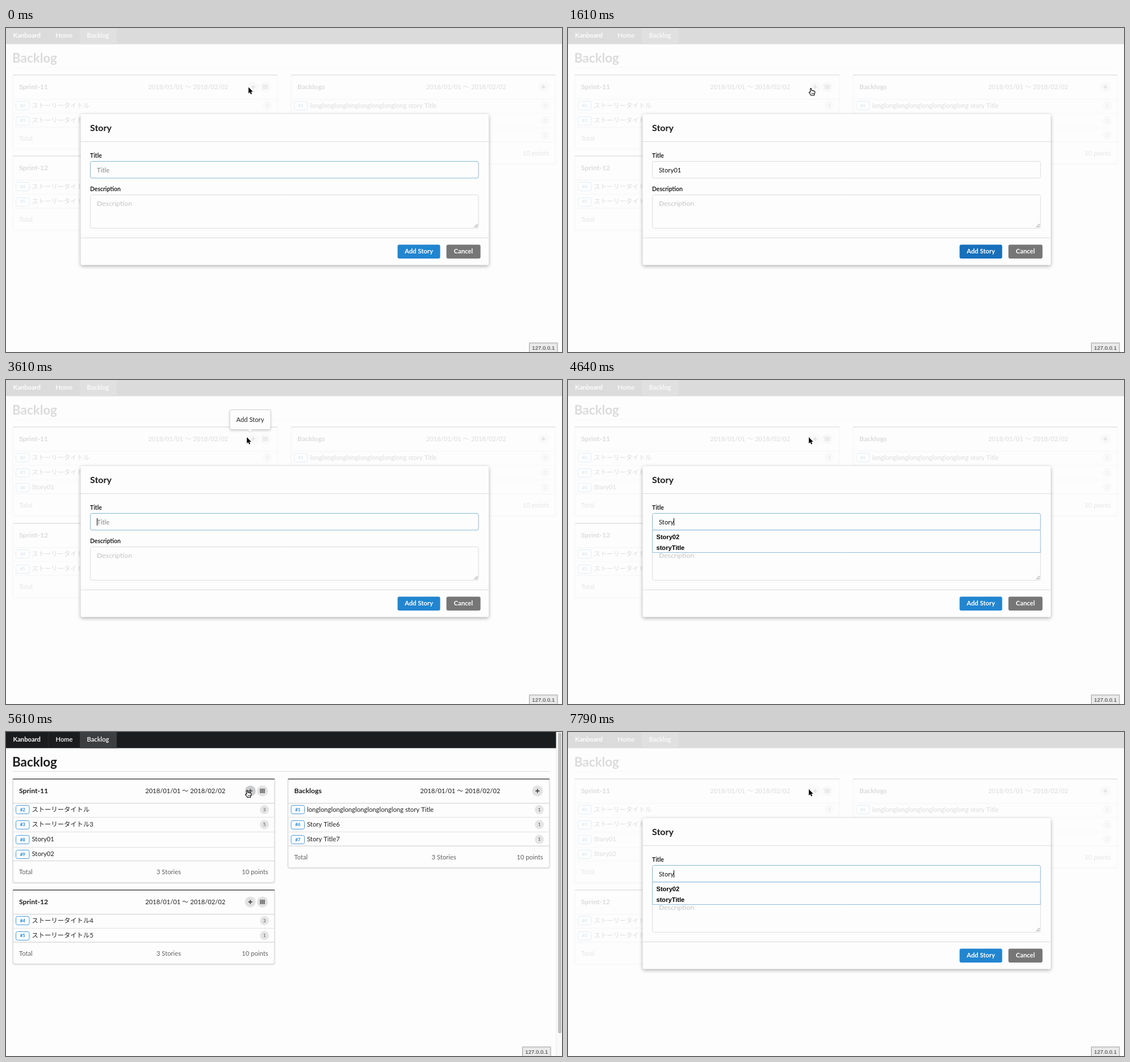
These frames come from a looping animation (979x572 px, 8000 ms). An HTML page with a canvas:

```html
<!DOCTYPE html>
<html lang="en">
<head>
<meta charset="utf-8">
<title>Backlog</title>
<style>
html, body { margin: 0; width: 100%; height: 100%; overflow: hidden; background: #fdfdfd; }
canvas { display: block; }
</style>
</head>
<body>
<canvas id="stage" width="979" height="572"></canvas>
<script>
const ctx = document.getElementById('stage').getContext('2d');
const LOOP = 8000;
const WHITE = '#fdfdfd';
const LINE = '#d9d9da';
const LATO = "Lato, 'Noto Sans CJK JP', 'Noto Sans CJK', sans-serif";
const ARIAL = "'Liberation Sans', sans-serif";

// [time, title text, number of suggestions]
const TYPING = [
  [0, '', 0], [50, 'S', 2], [230, 'St', 2], [307, 'Sto', 2], [383, 'Stor', 2],
  [460, 'Story', 2], [700, 'Story0', 1], [880, 'Story01', 0],
  [3550, '', 0], [4090, 'S', 0], [4180, 'S', 2], [4350, 'St', 2], [4450, 'Sto', 2],
  [4545, 'Stor', 2], [4640, 'Story', 2], [4820, 'Story0', 1], [4930, 'Story02', 0],
  [6660, '', 0], [7230, 'S', 0], [7290, 'S', 2], [7490, 'St', 2], [7590, 'Sto', 2],
  [7690, 'Stor', 2], [7790, 'Story', 2]
];
const FOCUS = [
  [0, 'title'], [1230, 'moving'], [1290, 'text'], [1440, 'button'],
  [3550, 'title'], [5230, 'moving'], [5290, 'text'], [5470, 'button'], [6660, 'title']
];
const MODAL = [[0, 1], [1690, 0], [3550, 0.4], [3610, 1], [5610, 0], [6660, 0.4], [6720, 1]];
const POPUP = [
  [0, 0], [1750, 1], [2560, 0.65], [2610, 0.3], [2670, 0], [2840, 0.5], [2900, 1],
  [3670, 0], [5670, 1], [6780, 0]
];
const HOVER = [[0, 0], [1610, 1], [2560, 0], [2780, 1], [3550, 0], [5610, 1], [6660, 0]];
const POINTER = [
  [0, 427, 104.5], [2380, 425.5, 104.3], [2440, 424, 104], [2500, 422, 103], [2560, 420, 102],
  [2610, 418.5, 101.5], [2670, 417.5, 101], [2720, 417, 101], [2780, 418, 101],
  [2840, 419, 101], [2900, 419.5, 101], [3130, 421.5, 101], [3190, 424, 101],
  [7999.9, 424, 101]
];

function at(list, t) {
  let hit = list[0];
  for (const key of list) if (key[0] <= t) hit = key;
  return hit;
}

function text(s, x, y, size, color, o = {}) {
  ctx.font = `${o.weight || 400} ${size}px ${o.font || LATO}`;
  ctx.textAlign = o.align || 'left';
  ctx.fillStyle = color;
  ctx.fillText(s, x, y);
}

function rect(x, y, w, h, color) {
  ctx.fillStyle = color;
  ctx.fillRect(x, y, w, h);
}

function box(x, y, w, h, r, fill, stroke, width = 1) {
  ctx.beginPath();
  ctx.roundRect(x, y, w, h, r);
  if (fill) { ctx.fillStyle = fill; ctx.fill(); }
  if (stroke) { ctx.strokeStyle = stroke; ctx.lineWidth = width; ctx.stroke(); }
}

function disc(x, y, r, color) {
  ctx.beginPath();
  ctx.arc(x, y, r, 0, Math.PI * 2);
  ctx.fillStyle = color;
  ctx.fill();
}

function poly(points, fill, stroke, width) {
  ctx.beginPath();
  points.forEach(([x, y]) => ctx.lineTo(x, y));
  ctx.closePath();
  ctx.lineJoin = 'round';
  if (stroke) { ctx.strokeStyle = stroke; ctx.lineWidth = width; ctx.stroke(); }
  if (fill) { ctx.fillStyle = fill; ctx.fill(); }
}

function shadow(color, blur, dy, draw) {
  ctx.save();
  ctx.shadowColor = color;
  ctx.shadowBlur = blur;
  ctx.shadowOffsetY = dy;
  draw();
  ctx.restore();
}

function plusButton(x, y, hot) {
  disc(x, y, 9.5, hot ? '#cacbcd' : '#e2e2e3');
  rect(x - 3.5, y - 1, 7, 2, '#555');
  rect(x - 1, y - 3.5, 2, 7, '#555');
}

function gridButton(x, y) {
  disc(x, y, 9.5, '#e2e2e3');
  for (let i = 0; i < 9; i++) {
    rect(x - 4.4 + (i % 3) * 3.1, y - 3.8 + Math.floor(i / 3) * 2.7, 2.6, 2.1, '#5a5a5a');
  }
}

// Draws a card and returns its height.
function card(x, y, w, title, rows, o = {}) {
  const n = rows.length, right = x + w, step = 26.2;
  const foot = 40.5 + step * n, height = foot + 38.5;
  shadow('rgba(34,36,38,.13)', 2, 1, () =>
    box(x + 0.5, y + 0.5, w - 1, height - 0.5, 3, WHITE, LINE));
  box(x, y, w, 2, [2, 2, 0, 0], '#767676');

  text(title, x + 11.5, y + 26, 12.2, '#1d1d1d', { weight: 700 });
  text('2018/01/01 ～ 2018/02/02', right - 87.3, y + 26, 11.2, '#222', { align: 'right' });
  if (o.grid) gridButton(right - 22, y + 22);
  plusButton(right - (o.grid ? 43.3 : 21.7), y + 22, o.hot);

  rect(x, y + 43, w, 1.4, LINE);
  rows.forEach(([id, name, points], i) => {
    const mid = y + 54.8 + step * i;
    if (i) rect(x, Math.round(mid - 12.8), w, 1, '#e0e0e1');
    box(x + 6, Math.round(mid - 7.5) + 0.5, 23.5, 15, 3, WHITE, '#4a9ad8');
    text('#' + id, x + 17.8, mid + 3.3, 8, '#2185d0', { weight: 700, align: 'center' });
    text(name, x + 34, mid + 3.8, 11.3, '#222');
    if (points) {
      disc(right - 18.5, mid + 0.3, 8, '#e5e5e5');
      text(points, right - 18.5, mid + 3.2, 8, '#666', { weight: 600, align: 'center' });
    }
  });
  rect(x, y + foot - 0.5, w, 1.4, LINE);

  const base = y + foot + 24;
  text('Total', x + 11.5, base, 11.2, '#606060');
  text('3 Stories', x + 275, base, 11.2, '#606060', { align: 'center' });
  text('10 points', right - 12, base, 11.2, '#606060', { align: 'right' });
  return height;
}

function page(t, wide, hot) {
  const W = wide ? 979 : 969, grow = wide ? 5 : 0;
  rect(0, 0, 979, 572, WHITE);
  rect(0, 0, W, 28.5, '#1b1c1d');
  rect(130, 0, 65, 28.5, '#3d3e3f');
  rect(74, 0, 1, 28, '#2a2b2c');
  text('Kanboard', 12.5, 17, 11.2, '#fff', { weight: 700 });
  text('Home', 87.5, 17, 11.2, '#fff', { weight: 600 });
  text('Backlog', 142.5, 17, 11.2, '#fff', { weight: 600 });
  text('Backlog', 11, 61, 22.4, '#1d1d1d', { weight: 700 });
  rect(11.5, 69, W - 22.5, 1, '#dcdcdc');

  const sprint = [[2, 'ストーリータイトル', '3'], [3, 'ストーリータイトル3', '5']];
  if (t >= 1690) sprint.push([8, 'Story01']);
  if (t >= 5610) sprint.push([9, 'Story02']);
  const left = 11.5, w = 462 + grow;
  const h = card(left, 82, w, 'Sprint-11', sprint, { grid: true, hot });
  card(left, Math.round(82 + h + 12), w, 'Sprint-12', [
    [4, 'ストーリータイトル4', '3'], [5, 'ストーリータイトル5', '1']
  ], { grid: true });
  card(496 + grow * 1.1, 82, 461.5 + grow, 'Backlogs', [
    [1, 'longlonglonglonglonglonglonglong story Title', '1'],
    [6, 'Story Title6', '1'], [7, 'Story Title7', '1']
  ]);

  if (!wide) {
    rect(969, 0, 10, 572, '#fafafa');
    rect(968.5, 0, 1, 572, '#e9e9e9');
    box(972, 1, 6, 531, 3, '#c1c1c1');
  }
}

function caret(x, y) {
  rect(Math.round(x), y, 1, 13, '#000');
}

function suggestions(count) {
  if (!count) return;
  const h = count === 2 ? 39.5 : 20.5;
  box(148.5, 265, 683.5, h, 0, WHITE, '#8dbcdf');
  ['Story02', 'storyTitle'].slice(0, count).forEach((s, i) =>
    text(s, 155.5, 280.5 + i * 19.3, 11.1, '#000', { weight: 700, font: ARIAL }));
}

function modal(t) {
  const focus = at(FOCUS, t)[1];
  const [, title, count] = at(TYPING, t);
  const border = name => focus === name ? '#85b7d9' : focus === 'moving' ? '#b2cbdc' : '#dcdcdd';

  shadow('rgba(0,0,0,.32)', 6, 2, () => box(131.5, 152, 718.5, 266.5, 3, WHITE));
  text('Story', 148, 182.3, 16, '#1d1d1d', { weight: 700 });
  rect(131.5, 200, 718.5, 1, '#dcdcdd');
  text('Title', 148, 228.5, 10.4, '#222', { weight: 700 });
  box(148.5, 235.5, 683.5, 29.5, 3, WHITE, border('title'));
  text('Description', 148, 287.5, 10.4, '#222', { weight: 700 });
  box(148.5, 294.5, 683.5, 59, 3, WHITE, border('text'));
  text('Description', 160, 313.8, 12.2, focus === 'text' ? '#858585' : '#c4c4c4');
  if (focus === 'text') caret(160, 303);

  ctx.strokeStyle = '#777';
  ctx.lineWidth = 1;
  ctx.beginPath();
  ctx.moveTo(824.5, 352); ctx.lineTo(830.5, 346);
  ctx.moveTo(828, 352); ctx.lineTo(830.5, 349.5);
  ctx.stroke();

  if (title) text(title, 160, 255, 11.3, '#111');
  else text('Title', 160, 255, 11.4, focus === 'title' ? '#858585' : '#c4c4c4');
  if (focus === 'title' && t >= 50) {
    ctx.font = `400 11.3px ${LATO}`;
    caret(160 + ctx.measureText(title).width, 244);
  }
  suggestions(count);

  rect(131.5, 370, 718.5, 1, '#dcdcdd');
  box(689.5, 382.5, 75, 24.5, 3, focus === 'button' ? '#1670bb' : '#2185d0');
  text('Add Story', 727, 398.3, 11.3, '#fff', { weight: 700, align: 'center' });
  box(775.5, 382.5, 60, 24.5, 3, '#767676');
  text('Cancel', 805.3, 398.3, 11.3, '#fff', { weight: 700, align: 'center' });
}

function popup() {
  const tip = [[425.5, 87.5], [430, 92], [434.5, 87.5]];
  poly(tip, WHITE, '#cfcfd0', 1.4);
  shadow('rgba(34,36,38,.2)', 4, 2, () => box(394, 52.5, 72, 35, 3, WHITE));
  box(394, 52.5, 72, 35, 3, WHITE, '#d0d0d1');
  poly(tip, WHITE);
  text('Add Story', 430, 73.5, 11.2, '#222', { align: 'center' });
}

function arrow(x, y) {
  const shape = [[0, 0], [0, 11], [2.5, 8.7], [4.1, 12.6], [6, 11.8], [4.4, 8], [7.8, 8]];
  poly(shape.map(([a, b]) => [x + a, y + b]), '#000', '#fff', 1.6);
}

function hand(x, y) {
  ctx.save();
  ctx.translate(x - 3, y + 1.5);
  ctx.beginPath();
  ctx.moveTo(2.8, 7.2);
  ctx.lineTo(2.6, 1.6);
  ctx.quadraticCurveTo(3.5, -0.3, 4.6, 1.4);
  ctx.lineTo(5, 4.6);
  ctx.quadraticCurveTo(6.2, 3.6, 7, 5);
  ctx.quadraticCurveTo(8.3, 4.1, 9, 5.5);
  ctx.quadraticCurveTo(10.8, 5, 10.9, 7);
  ctx.quadraticCurveTo(11, 9, 9.6, 11);
  ctx.lineTo(9.5, 13);
  ctx.lineTo(4, 13);
  ctx.quadraticCurveTo(3, 10.8, 0.6, 8.4);
  ctx.quadraticCurveTo(0.6, 6.3, 2.8, 7.2);
  ctx.closePath();
  ctx.fillStyle = '#fff';
  ctx.fill();
  ctx.strokeStyle = '#000';
  ctx.lineWidth = 1.1;
  ctx.lineJoin = 'round';
  ctx.stroke();
  ctx.beginPath();
  [5.2, 6.9, 8.6].forEach(k => { ctx.moveTo(k, 8.5); ctx.lineTo(k, 11); });
  ctx.lineWidth = 0.7;
  ctx.stroke();
  ctx.restore();
}

function status(x) {
  box(x, 556, 49.5, 20, 0, '#e9e9e9', '#9a9a9a');
  text('127.0.0.1', x + 24.8, 568, 9.6, '#333', { align: 'center', font: ARIAL });
}

function fade(alpha, draw) {
  if (!alpha) return;
  ctx.globalAlpha = alpha;
  draw();
  ctx.globalAlpha = 1;
}

function draw(t) {
  const shown = at(MODAL, t)[1], hover = at(HOVER, t)[1];
  const [, x, y] = at(POINTER, t);
  page(t, shown > 0, hover && !shown);
  fade(shown, () => {
    rect(0, 0, 979, 572, 'rgba(253,253,253,.85)');
    modal(t);
  });
  fade(at(POPUP, t)[1], popup);
  status(shown ? 921.5 : 909.5);
  (hover ? hand : arrow)(x, y);
}

const start = performance.now();
function tick() {
  draw((performance.now() - start) % LOOP);
  requestAnimationFrame(tick);
}
tick();
</script>
</body>
</html>
```
